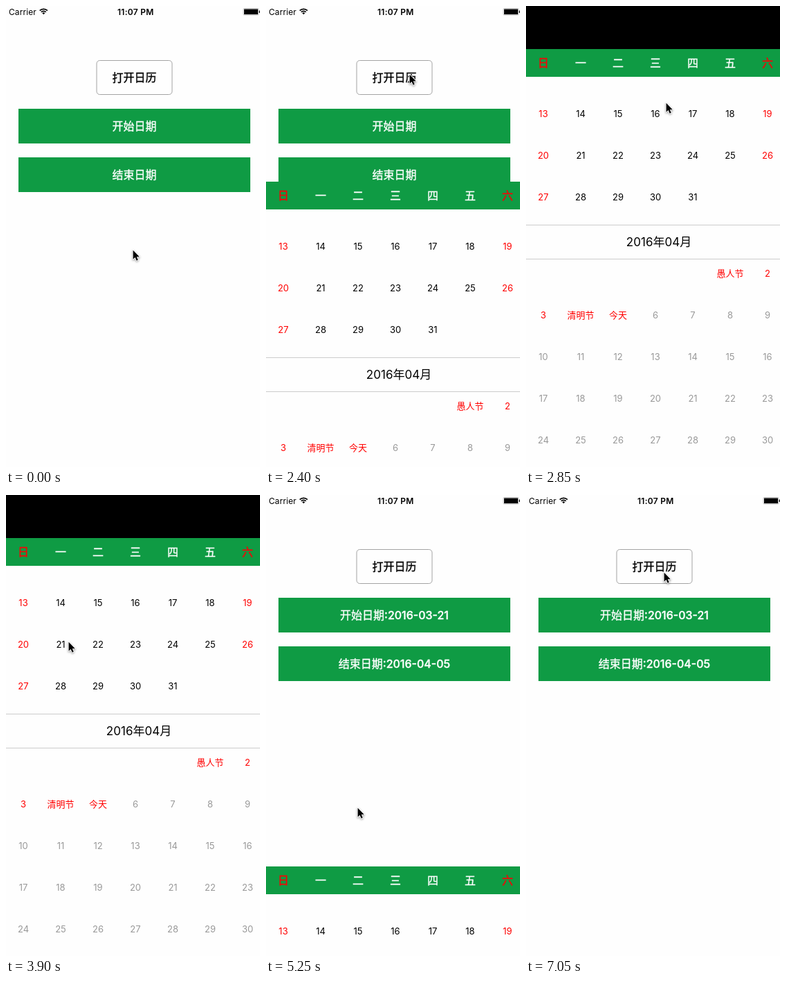
Recreate the animation shown at these times as an HTML page with a canvas. Size 367 by 664 pixels, loop 8 s.

```html
<!DOCTYPE html>
<html lang="zh">
<head>
<meta charset="utf-8">
<title>日历</title>
<style>
html, body { margin: 0; width: 100%; height: 100%; overflow: hidden; background: #fefefe; }
canvas { display: block; width: 367px; height: 664px; }
</style>
</head>
<body>
<canvas id="stage"></canvas>
<script>
const W = 367, H = 664, LOOP = 8000, TICK = 150;
const GREEN = '#0f9b44', RED = '#ff0000', GRAY = '#999', PAPER = '#fefefe';
const FONT = 'Inter, "Noto Sans CJK SC", "Noto Sans CJK", sans-serif';

const SHEET_IN = 2253, SHEET_SET = 2850, SHEET_OUT = 5103, SHEET_GONE = 5400;
const PICK_START = 4200;

// Eased pointer strokes, each from the end of the one before
const HOME = { x: 183, y: 351 };
const STROKES = [
  { from: 1200, to: 1800, x: 207, y: 98 },
  { from: 2550, to: 2850, x: 202, y: 139 },
  { from: 2850, to: 3000, x: 150, y: 358 },
  { from: 3150, to: 3900, x: 90, y: 211 },
  { from: 4200, to: 4500, x: 121, y: 418 },
  { from: 4650, to: 4950, x: 132, y: 450 },
  { from: 6300, to: 6600, x: 198, y: 259 },
  { from: 6750, to: 7050, x: 199, y: 111 }
];

const canvas = document.getElementById('stage');
const ctx = canvas.getContext('2d');
const ratio = window.devicePixelRatio || 1;
canvas.width = W * ratio;
canvas.height = H * ratio;

function box(x, y, w, h, color) {
  ctx.fillStyle = color;
  ctx.fillRect(x, y, w, h);
}

// Text centred vertically on y, with its baseline on a whole pixel
function text(str, x, y, size, color, { weight = 400, align = 'center', spacing = 0 } = {}) {
  const base = Math.round(y + size * 0.37);
  ctx.font = `${weight} ${size}px ${FONT}`;
  ctx.letterSpacing = spacing + 'px';
  ctx.textAlign = align;
  ctx.fillStyle = ctx.strokeStyle = color;
  ctx.fillText(str, x, base);
  // Chinese glyphs lack a medium weight, so thicken them
  if (weight === 500) {
    ctx.lineWidth = 0.35;
    ctx.strokeText(str, x, base);
  }
}

function roundRect(x, y, w, h, r) {
  ctx.beginPath();
  ctx.roundRect(x, y, w, h, r);
}

function drawWifi(x, y) {
  ctx.fillStyle = ctx.strokeStyle = '#000';
  ctx.lineWidth = 1.7;
  for (const r of [5, 7.9]) {
    ctx.beginPath();
    ctx.arc(x, y, r, -Math.PI * 0.75, -Math.PI * 0.25);
    ctx.stroke();
  }
  ctx.beginPath();
  ctx.moveTo(x, y);
  ctx.arc(x, y, 2.8, -Math.PI * 0.75, -Math.PI * 0.25);
  ctx.fill();
}

function drawStatusBar() {
  text('Carrier', 4, 8.4, 12, '#000', { align: 'left', spacing: 0.1 });
  drawWifi(54.3, 12.3);
  text('11:07 PM', 187.3, 8.4, 12, '#000', { weight: 600, spacing: 0.3 });
  ctx.strokeStyle = '#999';
  ctx.lineWidth = 0.6;
  roundRect(343, 3.5, 22, 9.6, 1.5);
  ctx.stroke();
  box(344, 4.5, 20, 7.6, '#000');
  box(365.6, 6.6, 1.2, 3.4, '#000');
}

function drawHome(chosen) {
  const bold = { weight: 500 };
  box(0, 0, W, H, PAPER);
  drawStatusBar();
  ctx.strokeStyle = '#a3a3a3';
  ctx.lineWidth = 1;
  roundRect(131, 78.5, 109, 49, 4.5);
  ctx.stroke();
  text('打开日历', 185.5, 103, 16, '#000', bold);
  const bars = [['开始日期', ':2016-03-21'], ['结束日期', ':2016-04-05']];
  bars.forEach(([label, date], i) => {
    const y = 148 + i * 70;
    box(18, y, 335, 50, GREEN);
    text(label + (chosen ? date : ''), 185.5, y + 25, 16, '#fff', bold);
  });
}

const colX = i => 25 + 54 * i;

function drawMarch(picked) {
  for (let day = 13; day <= 31; day++) {
    const col = (day - 13) % 7;
    const x = colX(col), y = 155 + 60 * Math.floor((day - 13) / 7);
    const on = picked && day === 21;
    if (on) {
      ctx.fillStyle = GREEN;
      ctx.beginPath();
      ctx.arc(x, y, 10, 0, Math.PI * 2);
      ctx.fill();
      text('开始', x, y + 20, 10, GREEN);
    }
    text(day, x, y, 13, on ? '#fff' : col % 6 ? '#000' : RED);
  }
}

function drawApril() {
  const names = { 1: '愚人节', 4: '清明节', 5: '今天' };
  for (let day = 1; day <= 30; day++) {
    const cell = day + 4;
    text(names[day] || day, colX(cell % 7), 385 + 60 * Math.floor(cell / 7), 13, day < 6 ? RED : GRAY);
  }
}

function drawSheet(offset, picked) {
  ctx.save();
  ctx.translate(0, offset);
  box(0, 62, W, H, PAPER);
  box(0, 62, W, 40, GREEN);
  [...'日一二三四五六'].forEach((name, i) => {
    text(name, colX(i), 82, 16, i % 6 ? '#fff' : '#f00808', { weight: 500 });
  });
  drawMarch(picked);
  box(0, 315, W, 1, '#ccc');
  box(0, 364, W, 1, '#ccc');
  text('2016年04月', 192, 340, 17, '#000');
  drawApril();
  ctx.restore();
}

function ease(u) {
  return u < 0.5 ? (2 * u) ** 2.7 / 2 : 1 - (2 - 2 * u) ** 2.7 / 2;
}

function pointerAt(t) {
  let at = HOME;
  for (const s of STROKES) {
    if (t <= s.from) break;
    const k = ease(Math.min(1, (t - s.from) / (s.to - s.from)));
    at = { x: at.x + (s.x - at.x) * k, y: at.y + (s.y - at.y) * k };
  }
  return at;
}

function drawPointer(t) {
  const { x, y } = pointerAt(t);
  ctx.save();
  ctx.translate(Math.round(x) + 0.6, Math.round(y) + 0.8);
  ctx.scale(0.92, 0.92);
  const arrow = new Path2D('M0 0V14L3.2 11.2L5.5 16.2L7.8 15.2L5.6 10.2H10Z');
  ctx.lineJoin = 'round';
  ctx.lineWidth = 2;
  ctx.strokeStyle = '#fff';
  ctx.shadowColor = 'rgba(0,0,0,0.4)';
  ctx.shadowBlur = 3 * ratio;
  ctx.shadowOffsetY = 1.2 * ratio;
  ctx.stroke(arrow);
  ctx.shadowColor = 'transparent';
  ctx.fillStyle = '#000';
  ctx.fill(arrow);
  ctx.restore();
}

// Critically damped spring: share of the way still to go
function remaining(ms) {
  const k = Math.max(0, ms) * 0.017;
  return (1 + k) * Math.exp(-k);
}

function draw(t) {
  ctx.setTransform(ratio, 0, 0, ratio, 0, 0);
  const resting = t >= SHEET_SET && t < SHEET_OUT;
  const shown = t >= SHEET_IN && t < SHEET_GONE;
  if (resting) box(0, 0, W, H, '#000');
  else drawHome(t >= SHEET_OUT);
  if (shown) {
    const away = resting ? 0 : t < SHEET_SET ? remaining(t - SHEET_IN) : 1 - remaining(t - SHEET_OUT);
    drawSheet(Math.round(away * H), t >= PICK_START);
  }
  drawPointer(t);
}

const start = performance.now();
function frame() {
  const t = (performance.now() - start) % LOOP;
  draw(Math.floor(t / TICK) * TICK);
  requestAnimationFrame(frame);
}
frame();
</script>
</body>
</html>
```
